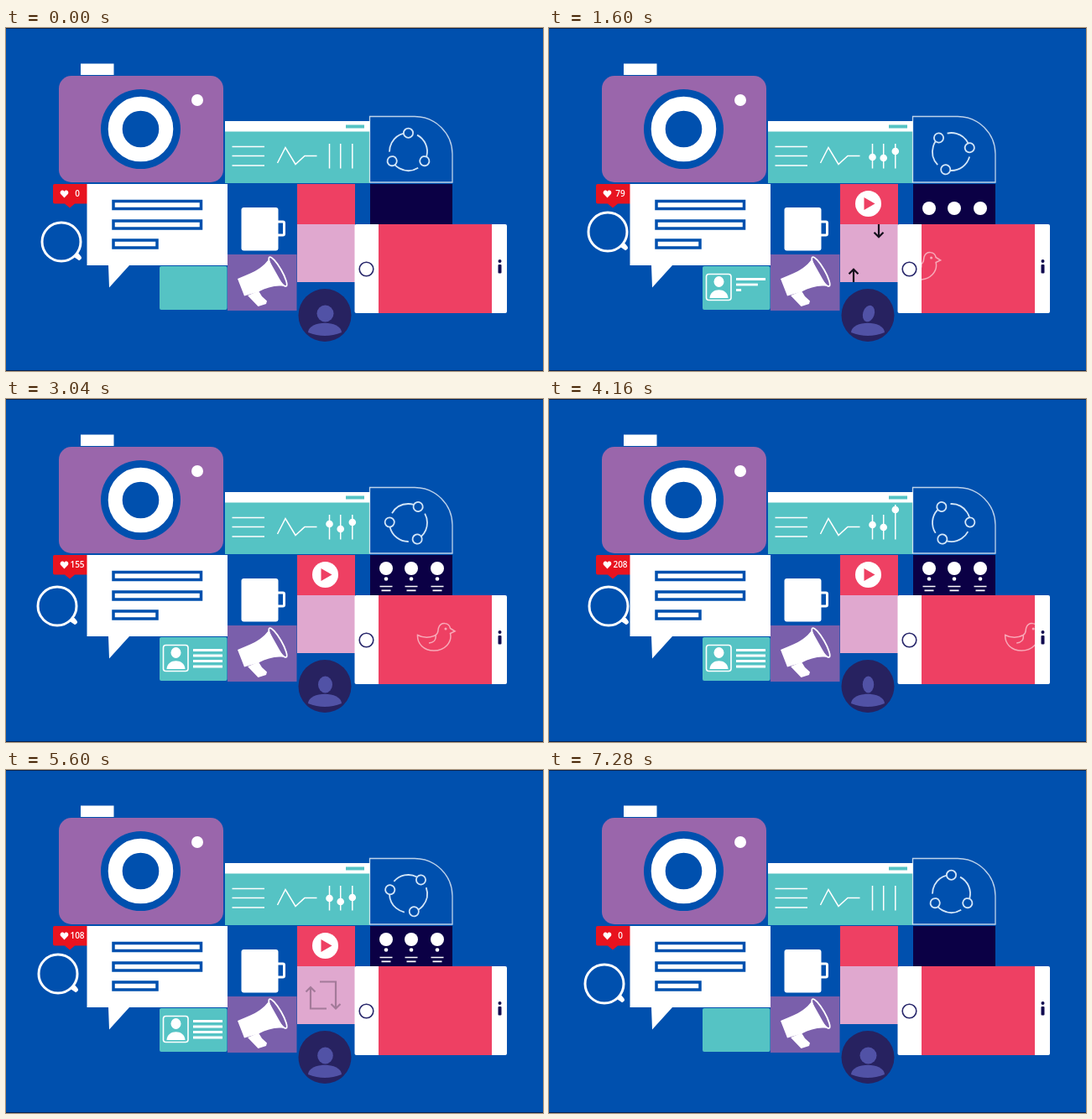
Recreate the animation shown at these times as an HTML page. Size 640 by 409 pixels, loop 7360 ms.

```html
<!DOCTYPE html>
<html lang="en">
<head>
<meta charset="utf-8">
<title>Social media tiles</title>
<style>
  html, body { margin: 0; width: 100%; height: 100%; overflow: hidden; background: #0050ae; }
  svg { display: block; width: 100%; height: 100%; }
  .line { fill: none; stroke: #fff; }
  .badge { font: 600 10px "Open Sans", sans-serif; fill: #fff; text-anchor: middle; }
</style>
</head>
<body>
<svg viewBox="0 0 640 409" preserveAspectRatio="none">
  <defs>
    <clipPath id="screenClip"><rect x="444" y="234" width="135" height="106"/></clipPath>
    <clipPath id="pinkClip"><rect x="347" y="234" width="69" height="69"/></clipPath>
  </defs>
  <rect width="640" height="409" fill="#0050ae"/>
  <path d="M0 .5H640M0 408.5H640" stroke="#0a2350"/>

  <!-- camera -->
  <rect x="89" y="42.5" width="39.500" height="13.500" fill="#fff"/>
  <rect x="63" y="57" width="196" height="127" rx="15" fill="#9a66ab"/>
  <circle cx="160.500" cy="120.500" r="47.500" fill="#0050ae"/>
  <circle cx="160.500" cy="120.500" r="30.300" fill="none" stroke="#fff" stroke-width="17"/>
  <circle cx="228" cy="86" r="7" fill="#fff"/>

  <!-- browser window -->
  <rect x="261" y="111" width="172.500" height="74" fill="#55c3c4"/>
  <rect x="261" y="111" width="172.500" height="12.500" fill="#fff"/>
  <rect x="405" y="115.500" width="22" height="4" fill="#55c3c4"/>
  <path class="line" stroke-width="1.500" d="M269.500 141.500H308M269.500 152.500H308M269.500 164H308"/>
  <path class="line" stroke-width="1.500" d="M323.500 161L333 142.500 345 162.500 356 152.500H370.500"/>
  <g id="sliders"></g>

  <!-- share -->
  <path class="line" opacity=".75" stroke-width="1.300" d="M433.500 105.500H487A45 45 0 0 1 532 150V184H433.500Z"/>
  <g id="share" stroke="#d3e6f8" stroke-width="1.800" fill="none"></g>

  <!-- messages -->
  <path fill="#e8131f" d="M58 186H97V209.500H82L76 214.500 70 209.500H58Q56 209.500 56 207.500V188Q56 186 58 186Z"/>
  <path fill="#fff" d="M69.500 202.500L65.200 198C63 195 67.500 191.500 69.500 195 71.500 191.500 76 195 73.800 198Z"/>
  <text id="count" class="badge" x="85" y="201"></text>
  <path fill="#fff" d="M96.500 186H264V283H147L123 309.500 122 283H96.500Z"/>
  <g fill="#fff" stroke="#0050ae" stroke-width="3.500">
    <rect x="128" y="206.500" width="104.500" height="9"/>
    <rect x="128" y="230" width="104.500" height="9"/>
    <rect x="128" y="253" width="52" height="9"/>
  </g>
  <g id="lens">
    <circle class="line" r="23" stroke-width="3"/>
    <path class="line" stroke-width="3" d="M16 17L22 21"/>
    <path class="line" stroke-width="5" stroke-linecap="round" d="M19.500 16.500L21.500 19"/>
  </g>

  <!-- mug -->
  <path id="steam" class="line" stroke-width="2.200" pathLength="1"
        d="M296 210Q292.500 206.500 295.500 203 298.500 199.500 296 195.500M303 210Q299.500 206.500 302.500 203 305.500 199.500 303 195.500M310 210Q306.500 206.500 309.500 203 312.500 199.500 310 195.500"/>
  <rect x="280.500" y="214" width="44" height="51.500" rx="3" fill="#fff"/>
  <rect class="line" x="322" y="231" width="9.500" height="16" rx="1.500" stroke-width="3"/>

  <!-- tiles -->
  <rect x="183" y="284" width="80.500" height="52" rx="2" fill="#55c3c4"/>
  <rect x="264" y="270" width="82.500" height="67" fill="#7a5fab"/>
  <rect x="347" y="186" width="69" height="48" fill="#ee4063"/>
  <rect x="347" y="234" width="69" height="69" fill="#e0a8cf"/>
  <rect x="434" y="186" width="98" height="48" fill="#0b0045"/>

  <!-- contact card -->
  <g id="person" fill="#fff">
    <rect class="line" x="187.500" y="293.500" width="29.500" height="31" rx="3" stroke-width="1.600"/>
    <ellipse cx="202.500" cy="302.500" rx="6" ry="6.500"/>
    <path d="M191.500 322C192 309 213 309 213.500 322Z"/>
  </g>
  <g id="cardLines" stroke="#fff" stroke-width="2.800"></g>

  <!-- megaphone -->
  <g fill="#fff">
    <path d="M276 299L289 293.500C300 289 307 284 313 276L331 308C321 306.500 311 309.500 301 314.500L284 319.500Z"/>
    <path d="M288 319L301 313.500 305 320 311 325.500 310 329 300.500 332Z"/>
    <ellipse class="line" cx="324" cy="290.500" rx="4.500" ry="20" stroke-width="1.800" transform="rotate(-30 324 290.500)"/>
  </g>

  <g id="play">
    <circle r="15.500" fill="#fff"/>
    <path d="M-5 -7.500L8 0 -5 7.500Z" fill="#ee4063"/>
  </g>

  <g clip-path="url(#pinkClip)">
    <g id="repeat" fill="none" stroke="#15101c" stroke-width="2.200">
      <path id="downArrow" d="M374 252.500H393V284M387.500 279L393 284.500 398.500 279"/>
      <path id="upArrow" d="M382 284.500H363V259M357.500 264.500L363 259 368.500 264.500"/>
    </g>
  </g>

  <g id="list" fill="#fff" stroke="#fff"></g>

  <!-- avatar -->
  <circle cx="380" cy="342.500" r="31.500" fill="#272260"/>
  <ellipse id="head" fill="#5152a6"/>
  <path fill="#5152a6" d="M360 363C361 348 399 348 400 363Q380 371 360 363Z"/>

  <!-- phone -->
  <rect x="415.500" y="234" width="181.500" height="106" rx="2" fill="#fff"/>
  <rect x="444" y="234" width="135" height="106" fill="#ee4063"/>
  <circle cx="429.500" cy="287.500" r="8.300" fill="none" stroke="#28276b" stroke-width="1.600"/>
  <circle cx="588.500" cy="278" r="2" fill="#100b50"/>
  <rect x="586.500" y="282" width="4" height="10.500" rx="1" fill="#100b50"/>
  <g clip-path="url(#screenClip)">
    <g id="bird" fill="none" stroke="#f8a9b8" stroke-width="1.500">
      <path d="M490.500 281.500C497 285 506 285 512 281.500 516 279 514.500 276 515.500 273 518 265.500 528 266 529.500 273.500L535 277 529.500 279.500C532 290 523 300 510 300 498 300 490 292 490.500 281.500Z"/>
      <path d="M512 281.500C513 287 510 290.500 504 291"/>
      <circle cx="524" cy="274" r=".8"/>
    </g>
  </g>
</svg>
<script>
const LOOP = 7360, STEP = 80;
const $ = id => document.getElementById(id);

function add(parent, tag, attrs) {
  const el = document.createElementNS("http://www.w3.org/2000/svg", tag);
  set(el, attrs);
  parent.append(el);
  return el;
}
function set(el, attrs) {
  for (const name in attrs) el.setAttribute(name, attrs[name]);
}

// Linear ramp from 0 to 1 between two times.
const ramp = (t, from, to) => Math.min(1, Math.max(0, (t - from) / (to - from)));
const ease = x => x * x * (3 - 2 * x);
// Rises over [a, b], falls over [c, d].
const span = (t, a, b, c, d) => ease(ramp(t, a, b)) * (1 - ease(ramp(t, c, d)));
// Eased interpolation through [time, value] stops.
function track(t, stops) {
  let value = stops[0][1];
  for (let i = 1; i < stops.length; i++)
    value += (stops[i][1] - stops[i - 1][1]) * ease(ramp(t, stops[i - 1][0], stops[i][0]));
  return value;
}

const knobStops = [
  [[1200, 153], [1600, 154], [3040, 149], [4160, 150], [5600, 153]],
  [[1200, 153], [1600, 155], [3040, 155], [4160, 153], [5600, 157], [6320, 153]],
  [[1200, 153], [1600, 147], [3040, 147], [4160, 132], [5600, 152], [6320, 153]]
];
const sliders = [385.5, 398.7, 412.8].map(x => ({
  x,
  bar: add($("sliders"), "path", { class: "line", "stroke-width": 1.5 }),
  knob: add($("sliders"), "circle", { cx: x, fill: "#fff" })
}));

add($("share"), "circle", { r: 22.5, "stroke-dasharray": "29.8 17.324", transform: "rotate(-62)" });
for (const turn of [0, 120, 240])
  add($("share"), "circle", { cy: -22.3, r: 5.6, transform: `rotate(${turn})` });

const cardLines = [299.5, 306, 312.5, 319].map(y => ({ y, el: add($("cardLines"), "path", {}) }));

const items = [453, 483, 514].map(x => ({
  x,
  dot: add($("list"), "circle", { cx: x, stroke: "none" }),
  bullet: add($("list"), "circle", { cx: x, cy: 214.5, stroke: "none" }),
  text: add($("list"), "path", { "stroke-width": 1.7 })
}));

function likes(t) {
  const up = 0.0525 * Math.max(0, t - 80);
  const down = 0.06945 * Math.max(0, 7157 - t);
  return Math.floor(Math.min(up, down));
}

function drawOrbits(t) {
  const turn = ramp(t, 80, 7120);
  $("share").setAttribute("transform", `translate(479.500 147.500) rotate(${360 * turn})`);
  const phase = turn * 6 * Math.PI;
  $("lens").setAttribute("transform",
    `translate(${66 - 5 * Math.sin(phase)} ${247.5 + 7.5 * Math.cos(phase)})`);
}

function drawSliders(t) {
  const size = span(t, 880, 1280, 6560, 6960);
  sliders.forEach(({ x, bar, knob }, i) => {
    const y = track(t, knobStops[i]);
    set(bar, { d: `M${x} ${Math.min(138, y - 6)}V167.500` });
    set(knob, { cy: y, r: 4.3 * size });
  });
}

function drawCard(t) {
  $("person").setAttribute("opacity", span(t, 720, 1120, 6640, 6960));
  cardLines.forEach(({ y, el }, i) => {
    const grow = ramp(t, 1000 + 260 * i, 1460 + 260 * i);
    const shrink = ramp(t, 6560 - 220 * i, 7000 - 220 * i);
    const width = 35 * grow * (1 - shrink);
    set(el, { d: width > 0.1 ? `M223 ${y}h${width}` : "" });
  });
}

function drawList(t) {
  items.forEach(({ x, dot, bullet, text }, i) => {
    const lag = 100 * i;
    const rise = ease(ramp(t, 1840 + lag, 2200 + lag));
    const drift = [0, -2, 3][i] * ease(ramp(t, 6080, 6320));
    set(dot, {
      cy: 215 - 13 * rise + drift,
      r: 8 * ease(ramp(t, 720 + lag, 1040 + lag)),
      opacity: 1 - ramp(t, 6160 + lag / 2, 6640 + lag / 2)
    });
    const show = span(t, 2160 + lag, 2480 + lag, 5840 + lag, 6080 + lag);
    set(bullet, { r: 2.3 * show });
    const a = 7.5 * show, b = 5.5 * show;
    set(text, { d: show ? `M${x - a} 223.500h${2 * a}M${x - b} 228.300h${2 * b}` : "" });
  });
}

function drawRepeat(t) {
  const local = t < 4000 ? t : t - 2960;
  const away = 1 - ramp(local, 1240, 2240);
  set($("downArrow"), { transform: `translate(0 ${-55 * away})` });
  set($("upArrow"), { transform: `translate(0 ${45 * away})` });
  set($("repeat"), { opacity: ramp(local, 1200, 1280) * (1 - ramp(local, 2400, 2740)) });
}

function draw(t) {
  drawOrbits(t);
  drawSliders(t);
  drawCard(t);
  drawList(t);
  drawRepeat(t);

  $("count").textContent = likes(t);
  $("bird").setAttribute("transform", `translate(${(t - 3040) * 0.0475} 0)`);
  $("play").setAttribute("transform",
    `translate(380.500 209.500) scale(${span(t, 560, 960, 5840, 6160)})`);

  const steam = ramp(t, 5920, 6240), gone = ramp(t, 6560, 6880);
  set($("steam"), { opacity: steam * (1 - gone), transform: `translate(0 ${4 * (1 - steam) - 3 * gone})` });

  const tilt = track(t, [[1120, 0], [1600, 18], [2160, 0]]);
  set($("head"), {
    cx: 380.5, cy: 340.5, ry: 10,
    rx: track(t, [[80, 10], [1600, 6.8], [3040, 8.5], [4160, 6.7], [5600, 9.3], [6320, 10]]),
    transform: `rotate(${tilt} 380.500 342)`
  });
}

const start = performance.now();
function tick(now) {
  const t = Math.max(0, now - start) % LOOP;
  draw(Math.floor(t / STEP) * STEP);
  requestAnimationFrame(tick);
}
draw(0);
requestAnimationFrame(tick);
</script>
</body>
</html>
```
